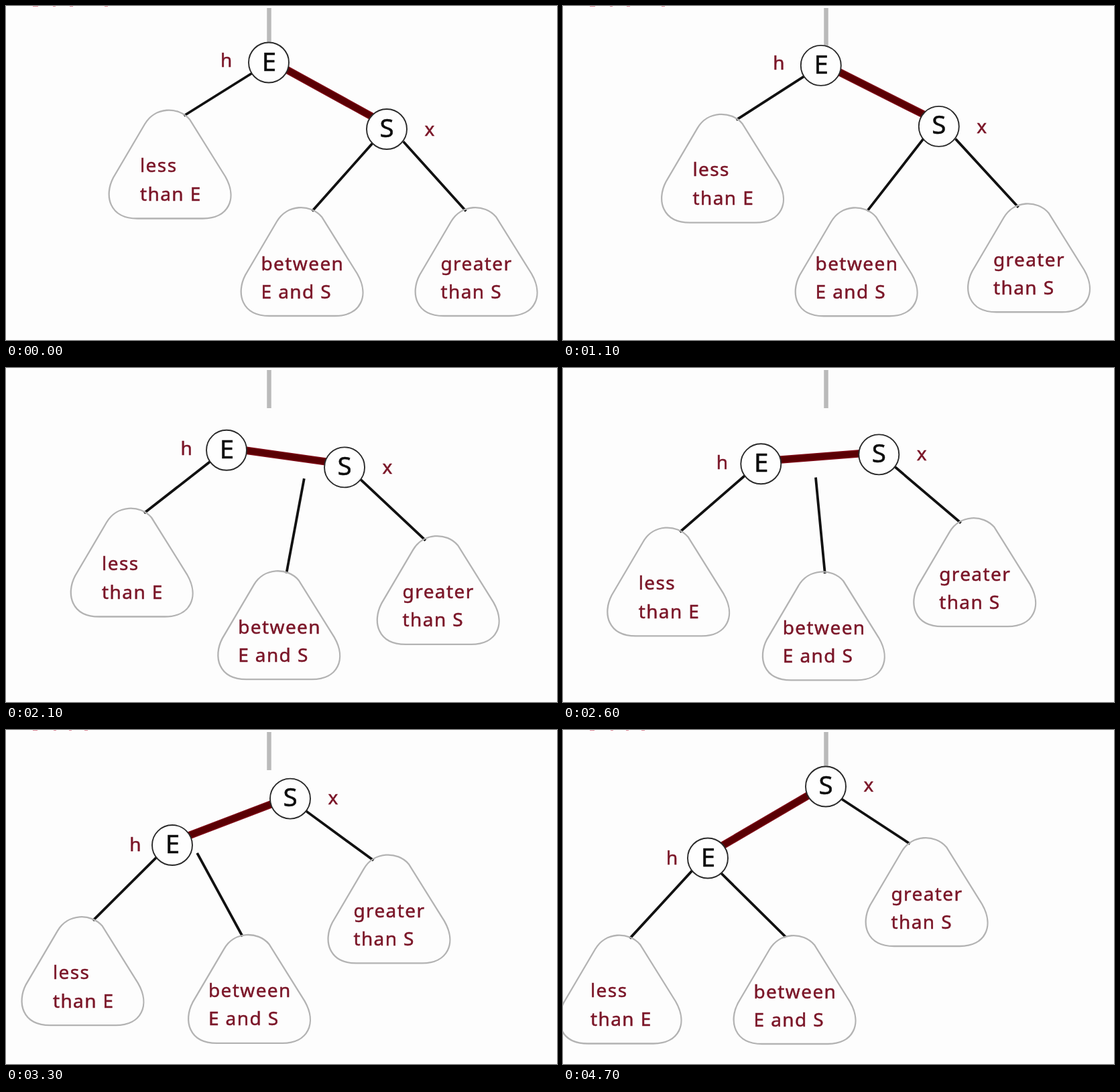
An HTML page that plays this animation: 822 by 499 pixels, repeating every 4800 ms.

```html
<!DOCTYPE html>
<html lang="en">
<head>
<meta charset="utf-8">
<title>Tree rotation</title>
<style>
  html, body { margin: 0; width: 100%; height: 100%; overflow: hidden; background: #fdfdfd; }
  svg { display: block; width: 822px; height: 499px; }
  text { font: 28px "Noto Sans", "Open Sans", sans-serif; letter-spacing: 1.4px; fill: #7b1628; stroke: #7b1628; stroke-width: .5; }
  .key { font-size: 38.5px; letter-spacing: 0; text-anchor: middle; fill: #0c0c0c; stroke: #0c0c0c; }
  .node circle { fill: #fefefe; stroke: #2a2a2a; stroke-width: 1.9; }
  .tri { fill: none; stroke: #b3b3b3; stroke-width: 2.3; }
  .edge { stroke: #111; stroke-width: 3.8; stroke-linecap: square; }
  .rim { stroke: #7c0714; stroke-width: 11.5; }
  .core { stroke: #5a0004; stroke-width: 8.5; }
  .stem { stroke: #bababa; stroke-width: 6.5; }
  .crumbs { stroke: #c8405a; stroke-width: 2; opacity: .6; }
</style>
</head>
<body>
<svg viewBox="0 0 822 499">
  <defs>
    <path id="tri" class="tri" d="M53 21C68 -5 103 -6 120 14L173 99C192 132 178 162 140 162H42C0 162 -8 128 6 101Z"/>
  </defs>
  <path id="before" class="crumbs" d="M40 0h8M70 0h4M95 0h5M147 0h5"/>
  <path id="after" class="crumbs" d="M40 0h7M71 0h4M94 0h4M117 0h5"/>
  <line class="stem" x1="392.5" y1="3" x2="392.5" y2="60"/>
  <line id="left" class="edge"/>
  <line id="mid" class="edge"/>
  <line id="right" class="edge"/>
  <line id="rim" class="rim"/>
  <line id="core" class="core"/>

  <g id="less"><use href="#tri"/><text x="46" y="92.5">less</text><text x="46" y="135.5">than E</text></g>
  <g id="between"><use href="#tri"/><text x="29.5" y="93.5">between</text><text x="29.5" y="135.5">E and S</text></g>
  <g id="greater"><use href="#tri"/><text x="37.5" y="93.5">greater</text><text x="37.5" y="135.5">than S</text></g>

  <g id="E" class="node"><circle r="30"/><text class="key" x="0.5" y="12.2">E</text></g>
  <g id="S" class="node"><circle r="30"/><text class="key" y="11.5">S</text></g>
  <g id="h"><text>h</text></g>
  <g id="x"><text>x</text></g>
</svg>
<script>
  const LOOP = 4800, STEP = 100;
  const $ = id => document.getElementById(id);

  // Time in ms and share of the turn done, before easing
  const pace = [[665, 0], [1100, .122], [2100, .404], [2600, .533], [3300, .728], [3800, .872], [4250, 1]];

  // Start x, y and end x, y
  const groups = {
    less: [154, 155.5, -5, 306.5],
    between: [351, 301, 255, 307],
    greater: [611, 301, 452, 161],
    E: [392, 84.5, 216, 191.5],
    S: [568, 184, 392, 84.5],
    h: [320, 91, 154, 200.5],
    x: [624.5, 194, 448.5, 92]
  };

  // Two moving ends per line; extra values bend a path: x skew, x bow, y bow
  const red = [[414, 92.5, 234, 175], [551, 168, 373, 93.5]];
  const lines = {
    left: [[366, 101, 191, 212], [267, 163, 101, 310]],
    mid: [[546, 206, 236, 214, 90, 15, -182], [458, 305, 331, 308, 45, 14, -6]],
    right: [[594, 204, 417, 104], [685, 305, 516, 169]],
    rim: red,
    core: red
  };

  function progress(t) {
    if (t <= pace[0][0]) return 0;
    const i = pace.findIndex(k => t < k[0]);
    if (i < 0) return 1;
    const [t0, u0] = pace[i - 1], [t1, u1] = pace[i];
    const u = u0 + (u1 - u0) * (t - t0) / (t1 - t0);
    return u * u * (3 - 2 * u);
  }

  function point([x0, y0, x1, y1, skew = 0, bowX = 0, bowY = 0], p) {
    const arc = p * (1 - p);
    return [
      x0 + (x1 - x0) * p + arc * (skew * (1 - 2 * p) + bowX),
      y0 + (y1 - y0) * p + arc * bowY
    ];
  }

  function draw(t) {
    const p = progress(t);
    for (const id in groups) {
      $(id).setAttribute("transform", `translate(${point(groups[id], p)})`);
    }
    for (const id in lines) {
      lines[id].forEach((end, i) => {
        const [x, y] = point(end, p);
        $(id).setAttribute("x" + (i + 1), x);
        $(id).setAttribute("y" + (i + 1), y);
      });
    }
    $("before").style.display = t < 1800 ? "" : "none";
    $("after").style.display = t >= 3100 ? "" : "none";
  }

  function tick() {
    const t = performance.now() % LOOP;
    draw(Math.floor(t / STEP) * STEP);
    requestAnimationFrame(tick);
  }
  tick();
</script>
</body>
</html>
```
